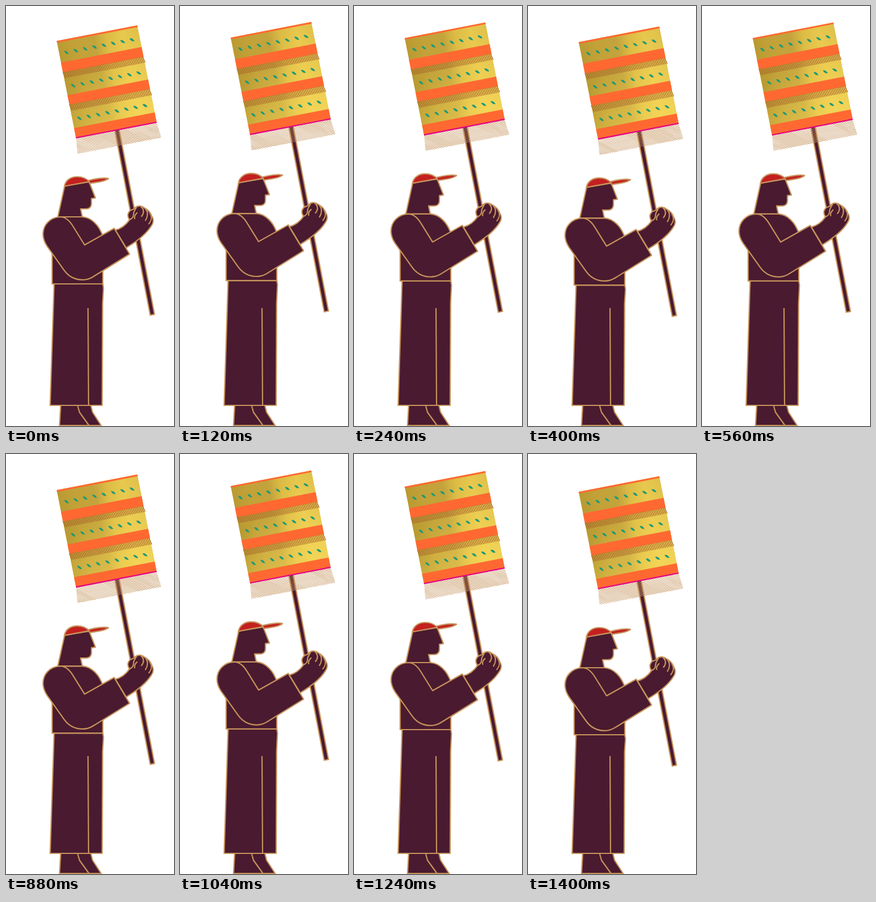
An HTML page for the animation above (1440 ms loop, 295x733 px).

```html
<!DOCTYPE html>
<html lang="en">
<head>
<meta charset="utf-8">
<title>Marcher with banner</title>
<style>
  html, body { margin: 0; width: 100%; height: 100%; overflow: hidden; background: #fff; }
  svg { display: block; width: 100vw; height: 100vh; }
  .skin { fill: #4a1a30; stroke: #c6935b; stroke-width: 2.2; stroke-linejoin: round; stroke-linecap: round; }
  .line { fill: none; }
</style>
</head>
<body>
<svg viewBox="0 0 295 733">
  <defs>
    <linearGradient id="gold">
      <stop offset="0" stop-color="#b99a32"/>
      <stop offset=".2" stop-color="#c2a238"/>
      <stop offset=".45" stop-color="#c3a33c"/>
      <stop offset=".6" stop-color="#dbbb44"/>
      <stop offset=".8" stop-color="#e6c64c"/>
      <stop offset="1" stop-color="#dabb48"/>
    </linearGradient>
    <linearGradient id="glow" x1=".3" y1=".3" x2=".8" y2="1">
      <stop offset="0" stop-color="#ffe260" stop-opacity="0"/>
      <stop offset="1" stop-color="#ffe260" stop-opacity=".6"/>
    </linearGradient>
    <clipPath id="hem"><path d="M0 173.700H144.200L147 200.500H-3Z"/></clipPath>
  </defs>

  <g class="skin">
    <path d="M96 697L94 732H167L152 709L149 697Z"/>
    <path class="line" d="M126 698L129 709L145 731"/>
    <path id="trousers"/>
    <path class="line" d="M144 528L145 697"/>
  </g>

  <g id="upper">
    <g transform="translate(89 61) rotate(-10.9)">
      <rect class="skin" x="70.8" y="170" width="7.6" height="331"/>
      <g id="banner" transform="skewX(.45)">
        <rect width="144.2" height="173" fill="url(#gold)"/>
        <rect width="144.2" height="173" fill="url(#glow)"/>
      </g>
    </g>

    <g class="skin">
      <path d="M81 400V485H170V402C164 383 150 369 134 368H92Z"/>
      <path d="M103 314L91 368H134L131 354H140C147 354 150 350 150 345V336L157 335L146 307Z"/>
      <path fill="#c42020" d="M145 304.500C156 301.500 172 299 180 301C177 304.500 164 307.500 147 309.500Z"/>
      <path fill="#c42020" d="M102.500 314.500C105 303 115 298 125 298C135 298 142 302 146 306.500Z"/>
      <path d="M192 391C204 388 212 380 217 373C213 368 213 362 218 357C222 355 225 355 227 352C232 347 239 349 244 353C250 356 254 361 256 367C260 372 259 379 255 384C247 397 231 410 211 422Z"/>
      <path class="line" d="M216 373C221 372 224 368 224 363C224 357 228 355 229 351M230 361C227 364 225 368 226 371M237 350C242 355 243 361 238 367M245 354C250 360 249 368 245 374M253 362C257 368 255 375 251 380"/>
      <path d="M138 417L118 385C112 375 104 368 95 368C77 369 65 382 65 398C65 405 68 413 72 419L102 461C112 475 127 480 142 477C148 476 152 473 157 470L217 433L190 388Z"/>
    </g>
  </g>
</svg>
<script>
const NS = 'http://www.w3.org/2000/svg';
const $ = id => document.getElementById(id);
const banner = $('banner');
const WIDTH = 144.2;

function add(tag, attrs) {
  const el = document.createElementNS(NS, tag);
  for (const key in attrs) el.setAttribute(key, attrs[key]);
  banner.append(el);
}

const band = (y, height, fill) => add('rect', { y, width: WIDTH, height, fill });

// Parallel threads hanging from y, each leaning sideways by lean.
function threads(y, length, gap, lean, attrs, from = 0) {
  let d = '';
  for (let u = from; u <= WIDTH; u += gap) d += `M${u.toFixed(1)} ${y}l${lean} ${length}`;
  add('path', { d, fill: 'none', ...attrs });
}

function leaves(x, y) {
  for (let i = 0; i < 8; i++) {
    add('path', {
      d: 'M-5 0Q-1 -3.800 5 0Q1 3.800 -5 0Z',
      fill: '#1c9a78',
      transform: `translate(${x + i * 16.75} ${y}) rotate(${46 - i})`
    });
  }
}

const ORANGE = '#ff6931';
const trim = { stroke: '#a4602a', 'stroke-width': 1.2 };
band(0, 3, ORANGE);
band(38.5, 17.5, ORANGE);
band(96.5, 17, ORANGE);
band(155, 16.5, ORANGE);
threads(55.5, 11, 2.9, 3, trim);
threads(113, 11.5, 2.9, 3, trim);
band(171.3, 2.4, '#e5087e');
threads(173.7, 27, 4, 34, {
  stroke: '#c4935c', 'stroke-width': 1, 'clip-path': 'url(#hem)'
}, -36);
leaves(12.8, 23);
leaves(13, 82);
leaves(12.6, 140);

// One bob: a quick eased rise, then a parabolic drop.
const BOB = 480, RISE = 200, LOW = 5, HIGH = -6, STEP = 40;

function bob(ms) {
  const t = (ms + STEP) % BOB;
  const k = t < RISE
    ? Math.pow(1 - t / RISE, 2.7)
    : Math.pow((t - RISE) / (BOB - RISE), 2);
  return HIGH + (LOW - HIGH) * k;
}

function draw(ms) {
  const dy = bob(Math.floor((ms + 3) / STEP) * STEP);
  $('upper').setAttribute('transform', `translate(0 ${dy.toFixed(2)})`);
  const top = 485 + dy;
  $('trousers').setAttribute('d',
    `M84.5 ${top}H170L171.2 ${top + 7}L169.6 519L168.8 697H77.5Z`);
}

function tick() {
  draw(performance.now());
  requestAnimationFrame(tick);
}
draw(0);
tick();
</script>
</body>
</html>
```
